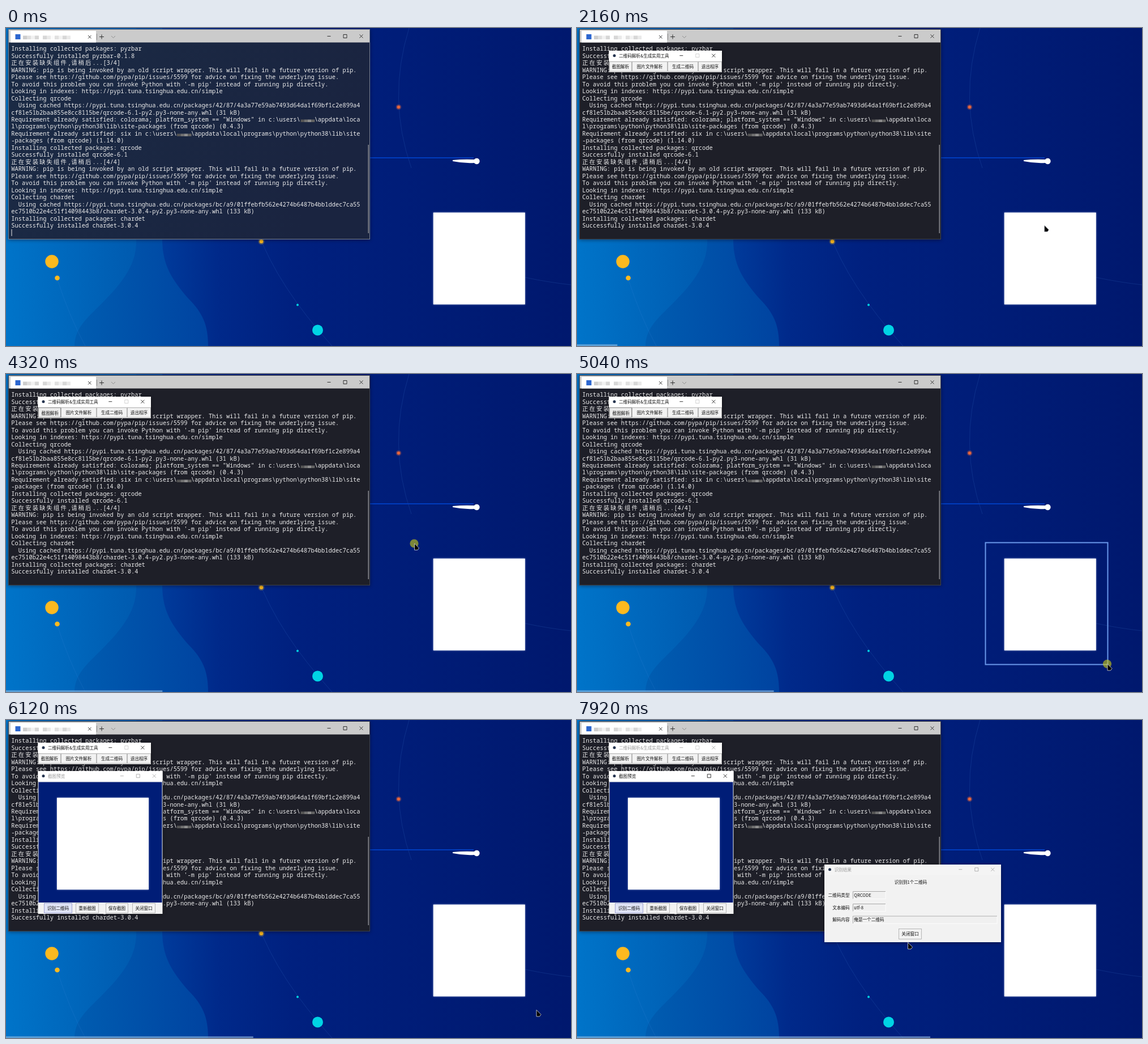
Write an HTML page that moves like this. It is 998 px wide and 561 px high and loops after 8 s.

```html
<!DOCTYPE html>
<html lang="zh">
<head>
<meta charset="utf-8">
<title>Terminal demo</title>
<style>
  html, body { margin: 0; width: 100%; height: 100%; overflow: hidden; background: #001d7c; }
  svg { display: block; width: 998px; height: 561px; }
  text { white-space: pre; }
  .log { font: 10.38px "Noto Sans Mono", "Noto Sans CJK SC", monospace; fill: #ececec; }
  .cjk { font-family: "Noto Sans CJK SC", sans-serif; letter-spacing: .2em; }
  .ui { font: 7.6px "Noto Sans CJK SC", "Noto Sans", sans-serif; fill: #111; }
  .win { filter: drop-shadow(0 1px 3px rgba(0, 0, 0, .45)); }
  .card { fill: #fff; filter: drop-shadow(0 0 1.5px rgba(190, 205, 240, .7)); }
  .btn rect { fill: #f2f2f2; stroke: #a8a8a8; stroke-width: .8; }
  .btn.focus rect { fill: #e0e4f6; stroke: #8f94cc; }
  .btn.down rect { fill: #ececec; stroke: #777; }
  .btn.down text { transform: translate(.8px, .8px); }
  .ctl { fill: none; stroke: #222; stroke-width: .9; }
  .idle .name { fill: #999; }
  .idle .ctl { stroke: #aaa; }
  .orbit { fill: none; stroke: #4d8fe0; stroke-opacity: .17; }
</style>
</head>
<body>
<svg viewBox="0 0 998 561" xmlns="http://www.w3.org/2000/svg">
  <defs>
    <linearGradient id="sky" gradientUnits="userSpaceOnUse" x1="0" x2="240" y1="0" y2="0">
      <stop stop-color="#0074c9"/><stop offset="1" stop-color="#0059ae"/>
    </linearGradient>
    <linearGradient id="hill" gradientUnits="userSpaceOnUse" x1="120" x2="357" y1="0" y2="0">
      <stop stop-color="#005db1"/><stop offset="1" stop-color="#0043a0"/>
    </linearGradient>
    <linearGradient id="deep" gradientUnits="userSpaceOnUse" x1="276" x2="998" y1="0" y2="0">
      <stop stop-color="#003b9b"/><stop offset=".14" stop-color="#00298a"/>
      <stop offset=".32" stop-color="#00207f"/><stop offset="1" stop-color="#00186e"/>
    </linearGradient>
    <linearGradient id="acrylic" x2="1" y2=".3">
      <stop stop-color="#1b2b45"/><stop offset="1" stop-color="#1a2440"/>
    </linearGradient>
  </defs>

  <rect width="998" height="561" fill="url(#sky)"/>
  <path fill="url(#hill)" d="M230 0V373C232 420 200 455 165 490C140 515 122 530 121 561H998V0Z"/>
  <path fill="url(#deep)" d="M276 0V373C276 420 295 445 320 475C345 500 357 520 357 561H998V0Z"/>
  <path class="orbit" d="M712 0Q673 125 716 247M445 360Q480 455 576 561M917 440Q960 449 998 453M90 441Q110 505 140 561"/>
  <g fill="#fdb91f">
    <circle cx="81" cy="412" r="11.7"/><circle cx="90.5" cy="441" r="4.3"/>
    <circle cx="451" cy="376.5" r="5.5" opacity=".3"/><circle cx="451" cy="376.5" r="3.3"/>
  </g>
  <g fill="#e8663c">
    <circle cx="693.5" cy="139.5" r="4.8" opacity=".35"/><circle cx="693.5" cy="139.5" r="2.8"/>
  </g>
  <g fill="#00d4e4"><circle cx="515" cy="488.5" r="2"/><circle cx="550.5" cy="533" r="9.5"/></g>
  <path d="M643 229H826" stroke="#003cbd" stroke-width="1.8"/>
  <path fill="#fff" d="M789 233Q808 231 827 232A5.3 5.3 0 1 1 827 238Q808 239 789 235Z"/>
  <rect class="card" x="754.8" y="325.6" width="162" height="162"/>

  <g id="term"></g>
  <g id="tool"></g>
  <g id="preview"></g>
  <g id="result"></g>

  <rect id="area" x="721.5" y="297.5" fill="none" stroke="#6a97ea" stroke-width="2"/>
  <g id="mouse">
    <circle id="ring" r="7.6" fill="#c8c814" fill-opacity=".62"/>
    <path d="M.5 0V11.5H6L8.5 8Z" fill="#000" stroke="#c9ccd4" stroke-width=".9"/>
  </g>
  <rect id="bar" y="558" height="3" fill="#9fc3e6" fill-opacity=".55"/>
</svg>

<script>
const $ = id => document.getElementById(id);

// Building blocks
const rect = (x, y, w, h, fill, more = '') =>
  `<rect x="${x}" y="${y}" width="${w}" height="${h}" fill="${fill}" ${more}/>`;
const label = (x, y, s, more = '') => `<text class="ui" x="${x}" y="${y + 2.9}" ${more}>${s}</text>`;
const mid = (x, y, s) => label(x, y, s, 'text-anchor="middle"');
const button = (x, y, w, h, s, cls = '') =>
  `<g class="btn ${cls}">${rect(x + .5, y + .5, w - 1, h - 1, '')}${mid(x + w / 2, y + h / 2, s)}</g>`;
// Minimise, maximise and close, spaced evenly and ending at x
const controls = (x, y, r = 3) =>
  `<path class="ctl" d="M${x - 57 - r} ${y}h${2 * r}"/>` +
  `<path class="ctl box" d="M${x - 28.5 - r} ${y - r}h${2 * r}v${2 * r}h${-2 * r}z"/>` +
  `<path class="ctl" d="M${x - r} ${y - r}l${2 * r} ${2 * r}m0 ${-2 * r}l${-2 * r} ${2 * r}"/>`;
const frame = (x, y, w, h, title, head = '#fff') =>
  rect(x, y, w, h, '#f2f2f2', 'class="win"') + rect(x, y, w, 18, head) +
  `<circle cx="${x + 9.5}" cy="${y + 8.7}" r="2.5" fill="#25344f"/>` +
  label(x + 17.5, y + 8.8, title).replace('"ui"', '"ui name"') + controls(x + w - 14.7, y + 8.7);
const mosaic = (x, y, n, w, h, base, span) => Array.from({ length: n }, (_, i) => {
  const v = base + (i * 37 % 5) * span;
  return rect(x + i * w, y, w, h, `rgb(${v},${v},${v})`);
}).join('');

const cjk = s => `<tspan class="cjk">${s}</tspan>`;
const intro = n => `${cjk('正在安装缺失组件')},${cjk('请稍后')}...[${n}/4]
WARNING: pip is being invoked by an old script wrapper. This will fail in a future version of pip.
Please see https://github.com/pypa/pip/issues/5599 for advice on fixing the underlying issue.
To avoid this problem you can invoke Python with '-m pip' instead of running pip directly.
Looking in indexes: https://pypi.tuna.tsinghua.edu.cn/simple`;
const done = (name, version) => `Installing collected packages: ${name}
Successfully installed ${name}-${version}`;
const log = String.raw`${done('pyzbar', '0.1.8')}
${intro(3)}
Collecting qrcode
  Using cached https://pypi.tuna.tsinghua.edu.cn/packages/42/87/4a3a77e59ab7493d64da1f69bf1c2e899a4
cf81e51b2baa855e8cc8115be/qrcode-6.1-py2.py3-none-any.whl (31 kB)
Requirement already satisfied: colorama; platform_system == "Windows" in c:\users\    \appdata\loca
l\programs\python\python38\lib\site-packages (from qrcode) (0.4.3)
Requirement already satisfied: six in c:\users\    \appdata\local\programs\python\python38\lib\site
-packages (from qrcode) (1.14.0)
${done('qrcode', '6.1')}
${intro(4)}
Collecting chardet
  Using cached https://pypi.tuna.tsinghua.edu.cn/packages/bc/a9/01ffebfb562e4274b6487b4bb1ddec7ca55
ec7510b22e4c51f14098443b8/chardet-3.0.4-py2.py3-none-any.whl (133 kB)
${done('chardet', '3.0.4')}`.split('\n');

$('term').innerHTML =
  rect(4.5, 2.5, 638, 370, '', 'id="pane" class="win"') +
  rect(5, 3, 637, 22.5, '#cbcbcb') + rect(8, 5, 151, 20.5, '#fff') +
  rect(16.5, 11, 9, 9, '#2b66cf') +
  mosaic(30, 13.5, 4, 7, 6.5, 205, 9) + mosaic(65, 13.5, 7, 7, 6.5, 215, 9) +
  '<path class="ctl" d="M145 13l5.5 5.5m0-5.5l-5.5 5.5M165 15.5h8m-4-4v8"/>' +
  '<path class="ctl" style="stroke:#888" d="M160.5 10v11M186 14l3.5 3.5l3.5-3.5"/>' +
  controls(627.5, 14.5) + rect(639.5, 206, 1.5, 156, '#8b8d94') +
  log.map((s, i) => `<text class="log" x="9.3" y="${40.2 + i * 12.48}">${s}</text>`).join('') +
  mosaic(520.5, 161.5, 4, 6.2, 4.5, 85, 14) + mosaic(302, 186.5, 4, 6.4, 4.5, 85, 14) +
  rect(9.5, 355, 1, 12, '#eee', 'id="caret"');

$('tool').innerHTML = frame(56.5, 40, 199.5, 38, '二维码解析&amp;生成实用工具') +
  button(57, 59, 40, 18, '截图解析') + button(97, 59, 63, 18, '图片文件解析') +
  button(160, 59, 54, 18, '生成二维码') + button(214, 59, 42, 18, '退出程序');
$('tool').querySelector('.box').style.stroke = '#ccc';
const shot = $('tool').querySelector('.btn');

$('preview').innerHTML = frame(56.5, 90, 220, 252, '截图预览') +
  rect(57.5, 109.5, 218, 212.5, '#001d77') + rect(90, 137.2, 162, 162, '', 'class="card"') +
  button(67, 323, 50, 18, '识别二维码', 'focus') + button(123, 323, 41, 18, '重新截图') +
  button(176, 323, 40, 18, '保存截图') + button(223, 323, 41, 18, '关闭窗口');

const field = (y, name, w, value) =>
  label(481.5, y, name, 'text-anchor="end"') +
  rect(487.5, y - 6.5, w, 13, '#f0f0f0', 'stroke="#fff" stroke-width=".8"') +
  `<path d="M487.5 ${y + 6.5}v-13h${w}" fill="none" stroke="#a0a0a0" stroke-width=".9"/>` +
  label(489.3, y, value);
$('result').innerHTML = frame(437, 255, 312, 137, '识别结果', '#f4f4f4') +
  mid(589.5, 286, '识别到1个二维码') + field(309, '二维码类型', 57.5, 'QRCODE') +
  field(331, '文本编码', 57.5, 'utf-8') + field(352.5, '解码内容', 254.5, '俺是一个二维码') +
  button(568, 368, 41, 19, '关闭窗口');
$('result').classList.add('idle');

// The recorder only ticks during these spans, in ms
const STEP = 76;
const acts = {
  blink: [150, 150], launch: [550, 920], glide: [2160, 2390], approach: [2620, 2930],
  press: [3080, 3160], travel: [3440, 4170], drag: [4260, 4790], settle: [4960, 5190],
  release: [5420, 5500], preview: [5660, 5970], aim: [6120, 6750], inspect: [6990, 7770],
  nudge: [7840, 7920]
};

const clamp = (v, a, b) => Math.min(b, Math.max(a, v));
const count = ([a, b]) => Math.round((b - a) / STEP) + 1;
const ticks = (t, [a, b]) => t < a ? 0 : clamp(Math.floor((t - a) / STEP + 1.25), 1, count([a, b]));

// Mouse moves: where each act leads, an optional bend, and the part of the act used
const home = [825, 348];
const moves = [
  { act: 'glide', to: [90, 250], begin: .25 },
  { act: 'approach', to: [69, 70], bend: [-55, 100] },
  { act: 'travel', to: [721, 299], bend: [1000, 305] },
  { act: 'drag', to: [921, 498], begin: .37 },
  { act: 'settle', to: [936.5, 511.5], end: .5 },
  { act: 'aim', to: [96, 329], begin: .11 },
  { act: 'inspect', to: [571, 395], begin: .36 },
  { act: 'nudge', to: [584, 392.5] }
];

function mouseAt(n) {
  let pos = home;
  for (const { act, to, bend, begin = 0, end = 1 } of moves) {
    const p = clamp((n[act] / count(acts[act]) - begin) / (end - begin), 0, 1);
    const u = p * p * (3 - 2 * p);
    pos = pos.map((a, i) => {
      const c = bend ? bend[i] : (a + to[i]) / 2;
      return a * (1 - u) ** 2 + 2 * c * u * (1 - u) + to[i] * u * u;
    });
  }
  return pos;
}

const show = (el, on) => { el.style.display = on ? '' : 'none'; };
const set = (el, attrs) => { for (const k in attrs) el.setAttribute(k, attrs[k]); };

// Fade and grow a window in over five ticks
function open(id, n, cx, cy) {
  const a = 1 - (1 - clamp(n / 5, 0, 1)) ** 1.6, s = .955 + .045 * a;
  show($(id), a > 0);
  set($(id), { opacity: a, transform: `translate(${cx} ${cy}) scale(${s}) translate(${-cx} ${-cy})` });
}

function draw(n, total) {
  set($('bar'), { width: total * 8.914 });
  show($('caret'), !n.blink);
  set($('pane'), n.launch ? { fill: '#1e1f28', stroke: '#40424b' } : { fill: 'url(#acrylic)', stroke: '#7c8290' });
  open('tool', n.launch, 156, 59);
  open('preview', n.preview, 167, 216);
  open('result', n.inspect - 2, 593, 323.5);
  $('tool').classList.toggle('idle', n.inspect > 1);
  $('preview').classList.toggle('idle', n.inspect < 2);
  shot.classList.toggle('down', n.press && !n.release);

  const [x, y] = mouseAt(n);
  show($('mouse'), n.glide);
  set($('mouse'), { transform: `translate(${x} ${y})` });
  show($('ring'), (n.press === 1) || (n.drag && n.settle < 4) || n.inspect === 1);
  show($('area'), n.drag > 3 && !n.release);
  set($('area'), { width: Math.max(0, x - 720.5), height: Math.max(0, y - 296.5) });
}

let last = -1;
function loop() {
  const t = performance.now() % 8000, n = {};
  let total = 0;
  for (const name in acts) total += n[name] = ticks(t, acts[name]);
  if (total !== last) draw(n, last = total);
  requestAnimationFrame(loop);
}
loop();
</script>
</body>
</html>
```
